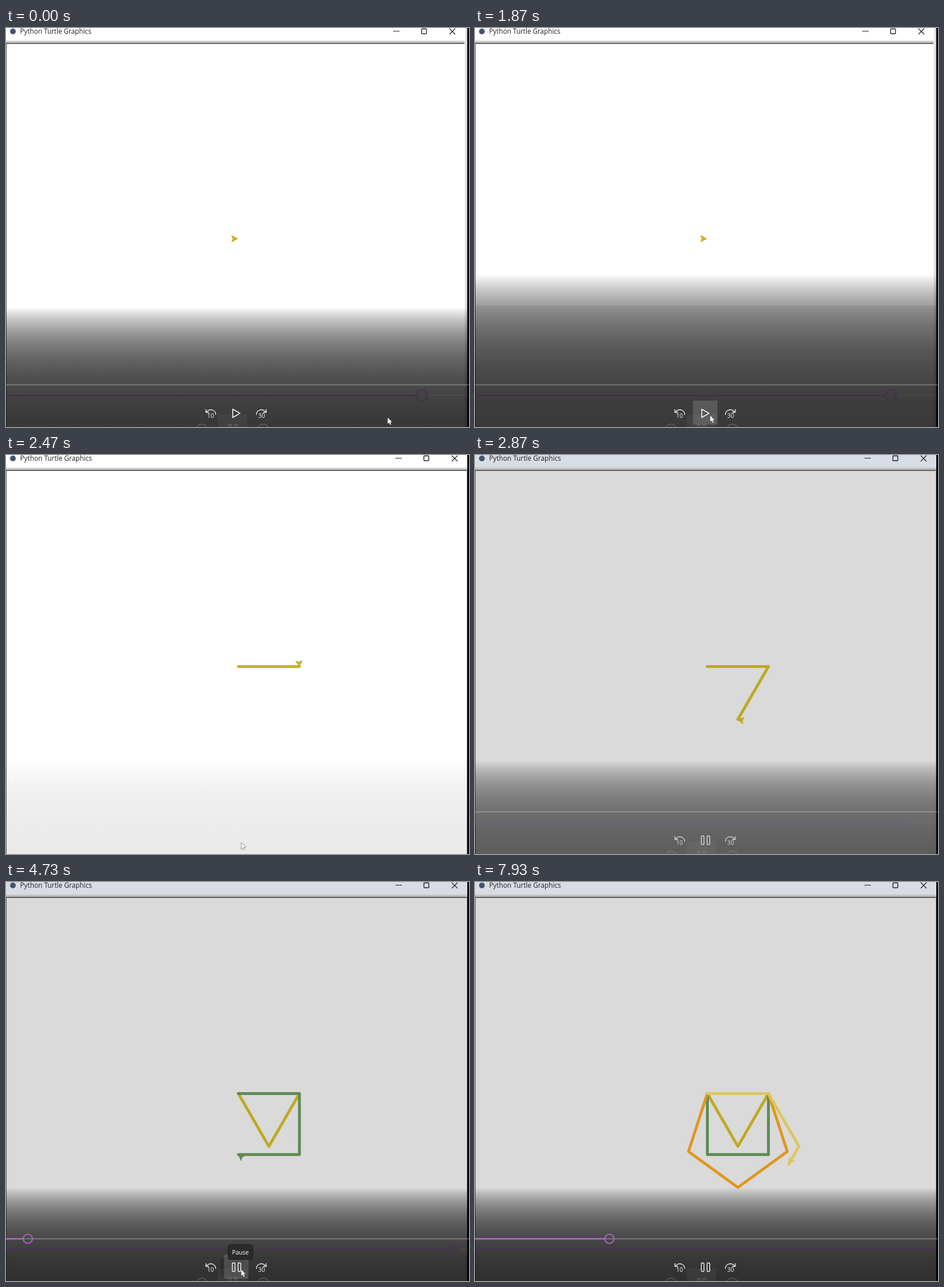
An HTML page with a canvas that plays this animation: 806 by 695 pixels, repeating every 8 s.

```html
<!DOCTYPE html>
<html lang="en">
<head>
<meta charset="utf-8">
<title>Turtle polygons</title>
<style>
html, body { margin: 0; width: 100%; height: 100%; overflow: hidden; background: #000; }
canvas { display: block; }
</style>
</head>
<body>
<canvas id="stage" width="806" height="695"></canvas>
<script>
const W = 806, H = 695, LOOP = 8000, STEP = 200 / 3;
const ctx = document.getElementById('stage').getContext('2d');
const UI = '"Open Sans", "Noto Sans", sans-serif';
const RAD = Math.PI / 180;

// Linear interpolation through [time, value] pairs.
function at(keys, t) {
  if (t <= keys[0][0]) return keys[0][1];
  for (let i = 1; i < keys.length; i++) {
    const [t0, a] = keys[i - 1], [t1, b] = keys[i];
    if (t <= t1) return a + (b - a) * (t - t0) / (t1 - t0);
  }
  return keys[keys.length - 1][1];
}

const tracks = {
  hops: [[2090, 0], [2467, 19], [2867, 40.5], [4733, 122.5], [7933, 274]],
  dim: [[2670, 0], [2810, 1]],
  shadeTop: [[0, 486], [133, 430], [1870, 428], [2067, 506], [2467, 532]],
  shade: [[0, .82], [133, .8], [1870, .8], [2067, .68], [2467, .085], [2670, 0], [2740, .12], [2867, .6], [2980, .82]],
  controls: [[2067, 1], [2400, 0], [2700, 0], [2867, .8], [2980, 1]],
  step: [[70, 0], [133, .07], [1870, .07], [2000, 0]],
  hover: [[1000, 0], [1100, 1], [2130, 1], [2400, 0], [2930, 0], [3000, 1], [6530, 1], [6670, 0]],
  tip: [[3800, 0], [3930, 1], [5070, 1], [5200, 0]],
  seek: [[2067, 724], [2867, 742], [4733, 779], [7933, 843]],
  outerSeek: [[2867, -76], [4733, 38], [7933, 234]],
  cursorX: [[1000, 436], [1300, 409]],
  cursorY: [[1000, 698], [1300, 674.5]]
};

const shapes = [
  { sides: 3, turnHops: 14, color: '#bfa924' },
  { sides: 4, turnHops: 11, color: '#5e8c54' },
  { sides: 5, turnHops: 9, color: '#e0971f' },
  { sides: 6, turnHops: 7, color: '#dcc75c' }
];
const SIDE = 106.3, MOVE_HOPS = 9;

function rect(x, y, w, h, fill) {
  ctx.fillStyle = fill;
  ctx.fillRect(x, y, w, h);
}

function line(points, color, width, close) {
  ctx.beginPath();
  points.forEach(([x, y]) => ctx.lineTo(x, y));
  if (close) ctx.closePath();
  ctx.strokeStyle = color;
  ctx.lineWidth = width;
  ctx.stroke();
}

function ring(x, y, r, color, width) {
  ctx.beginPath();
  ctx.arc(x, y, r, 0, 7);
  ctx.strokeStyle = color;
  ctx.lineWidth = width;
  ctx.stroke();
}

function roundBox(x, y, w, h, r) {
  ctx.beginPath();
  ctx.roundRect(x, y, w, h, r);
}

function text(s, x, y, size, color, align = 'left') {
  ctx.font = size + 'px ' + UI;
  ctx.textAlign = align;
  ctx.fillStyle = color;
  ctx.fillText(s, x, y);
}

function drawWindow(early, dim) {
  const v = Math.round(255 - 37 * dim);
  const edge = early ? 798 : 802;
  const dx = early ? 0 : 4;
  rect(0, 0, W, H, '#000');
  rect(0, 0, 803, H, `rgb(${v},${v},${v})`);
  if (dim) rect(0, 0, 803, 22, `rgba(216,222,236,${dim * .6})`);
  rect(0, 22, 803, 2, dim > .5 ? '#c4c4c4' : '#d4d4d4');
  rect(0, 24, 803, 2, dim > .5 ? '#b8b8b8' : '#c2c2c2');
  rect(0, 26, edge, 1.6, '#484848');
  rect(0, 27, 1, H, '#555');
  if (early) {
    rect(798, 22, 2, H, '#f0f0f0');
    rect(800, 0, 3, H, '#d6d6d6');
  } else rect(802, 26, 1, H, '#999');

  ctx.fillStyle = '#46536f';
  ctx.beginPath();
  ctx.arc(12, 6, 5, 0, 7);
  ctx.fill();
  text('Python Turtle Graphics', 24.5, 10, early ? 11.7 : 11.8, '#222');

  line([[674 + dx, 5.5], [685 + dx, 5.5]], '#222', 1);
  roundBox(723.5 + dx, 1.5, 8.5, 8.5, 1);
  ctx.lineWidth = 1.4;
  ctx.stroke();
  line([[772 + dx, 1], [782 + dx, 11]], '#222', 1.2);
  line([[782 + dx, 1], [772 + dx, 11]], '#222', 1.2);
}

function arrowHead(x, y, heading, color) {
  ctx.save();
  ctx.translate(x, y);
  ctx.rotate(heading);
  ctx.scale(1.12, 1.12);
  ctx.fillStyle = color;
  line([[0, 0], [-9, -5], [-7, 0], [-9, 5]], color, 1, true);
  ctx.fill();
  ctx.restore();
}

function drawTurtle(hops, early, dim) {
  const home = early ? [403, 367] : [404.5, 368.5];
  let left = hops, heading = 0, [x, y] = home, color;
  ctx.lineCap = ctx.lineJoin = 'round';
  for (const s of shapes) {
    color = s === shapes[0] && dim < .5 ? '#c8b22c' : s.color;
    [x, y] = home;
    heading = 0;
    const path = [[x, y]];
    for (let i = 0; i < s.sides && left >= 0; i++) {
      const go = SIDE * Math.min(1, left / MOVE_HOPS);
      x += go * Math.cos(heading);
      y += go * Math.sin(heading);
      path.push([x, y]);
      left -= MOVE_HOPS;
      if (left < 0) break;
      heading += 360 / s.sides * RAD * Math.min(1, left / s.turnHops);
      left -= s.turnHops;
    }
    if (hops > 0) line(path, color, 5);
    if (left < 0) break;
  }
  arrowHead(x, y, heading, color);
  ctx.lineCap = 'butt';
  ctx.lineJoin = 'miter';
}

function drawShade(top, strength, step) {
  if (strength <= 0) return;
  const g = ctx.createLinearGradient(0, top, 0, H);
  for (let i = 0; i <= 12; i++) {
    const f = i / 12;
    g.addColorStop(f, `rgba(0,0,0,${strength * (1 - Math.exp(-3.1 * f))})`);
  }
  rect(0, top, W, H - top, g);
  if (step) rect(0, 483, W, H - 483, `rgba(0,0,0,${step})`);
}

function drawInnerBar(t, x) {
  const color = t < 1870 ? '#4a2752' : t < 2600 ? '#6a447c' : t < 2940 ? '#67628c' : '#4b2f57';
  line([[0, 640], [Math.min(x - 10, 803), 640]], color, 2);
  line([[x + 10, 640], [W, 640]], 'rgba(255,255,255,.06)', 1.5);
  ring(x, 640, 9.5, color, 1.6);
}

function skipIcon(x, y, dir, label, color) {
  ctx.save();
  ctx.translate(x, y);
  ctx.scale(dir, 1);
  ctx.strokeStyle = color;
  ctx.lineWidth = 1.3;
  ctx.beginPath();
  ctx.ellipse(0.5, 2, 8.5, 8, 0, -155 * RAD, 5 * RAD);
  ctx.stroke();
  line([[-8, -7], [-8, -1.5], [-2.5, -1.5]], color, 1.3);
  ctx.restore();
  if (label) text(label, x, y + 8, 10.5, color, 'center');
}

function bars(x, y, color) {
  ctx.strokeStyle = color;
  ctx.lineWidth = 1.3;
  for (const dx of [-7, 3]) {
    roundBox(x + dx, y - 7.5, 4.6, 15, 1.5);
    ctx.stroke();
  }
}

function drawControls(t, hover) {
  const playing = t >= 1900;
  const ghost = 'rgba(255,255,255,.2)';

  // Faint second row cut by the bottom edge.
  rect(369, 673, 51, 22, 'rgba(255,255,255,.045)');
  ring(341, 700, 10, ghost, 1.3);
  ring(448, 700, 10, ghost, 1.3);
  bars(394.5, 698, ghost);
  if (t > 2940 && hover) rect(373, 654, 48, 32, `rgba(0,0,0,${.15 * hover})`);
  if (hover) {
    ctx.fillStyle = `rgba(255,255,255,${.15 * hover})`;
    roundBox(379.5, 649, 42.5, 42, 2);
    ctx.fill();
  }

  line([[0, 621.5], [W, 621.5]], 'rgba(255,255,255,.26)', 2);
  const x = at(tracks.outerSeek, t);
  if (x > -10) {
    line([[0, 621.5], [x - 8, 621.5]], '#c065dc', 2);
    ring(x, 621.5, 8, '#c065dc', 1.7);
  }

  skipIcon(356, 671, 1, '10', '#f4f4f4');
  skipIcon(445, 671, -1, '30', '#f4f4f4');
  if (playing) bars(401, 671, '#fff');
  else {
    ctx.lineJoin = 'round';
    line([[394.7, 664], [394.7, 678.5], [407.5, 671.2]], '#fff', 1.5, true);
    ctx.lineJoin = 'miter';
  }
}

function drawTip(alpha) {
  if (!alpha) return;
  ctx.globalAlpha = alpha;
  ctx.fillStyle = '#2b2b2b';
  ctx.strokeStyle = '#1d1d1d';
  ctx.lineWidth = 1;
  roundBox(386.5, 631.5, 43, 26, 4);
  ctx.fill();
  ctx.stroke();
  text('Pause', 408, 648.5, 10.4, '#fff', 'center');
  ctx.globalAlpha = 1;
}

function drawCursor(x, y) {
  ctx.save();
  ctx.translate(x, y);
  ctx.fillStyle = '#fff';
  line([[.5, .5], [.5, 11.5], [3, 9.2], [4.8, 13.2], [6.6, 12.4], [4.9, 8.6], [8.2, 8.4]], '#222', 1, true);
  ctx.fill();
  ctx.restore();
}

function draw(t) {
  const v = {};
  for (const k in tracks) v[k] = at(tracks[k], t);
  const early = t < 2200;
  drawWindow(early, v.dim);
  drawTurtle(v.hops, early, v.dim);
  drawShade(v.shadeTop, v.shade, v.step);
  rect(803, 0, 3, H, '#000');
  if (v.controls > 0) {
    ctx.globalAlpha = v.controls;
    drawInnerBar(t, v.seek);
    drawControls(t, v.hover);
    ctx.globalAlpha = 1;
  }
  drawTip(v.tip);
  if (t < 100) drawCursor(664, 678);
  else if ((t >= 1000 && t < 2690) || (t >= 2940 && t < 6600)) drawCursor(v.cursorX, v.cursorY);
}

const start = performance.now();
function tick() {
  const t = (performance.now() - start) % LOOP;
  draw(Math.floor((t + 4) / STEP) * STEP);
  requestAnimationFrame(tick);
}
tick();
</script>
</body>
</html>
```
